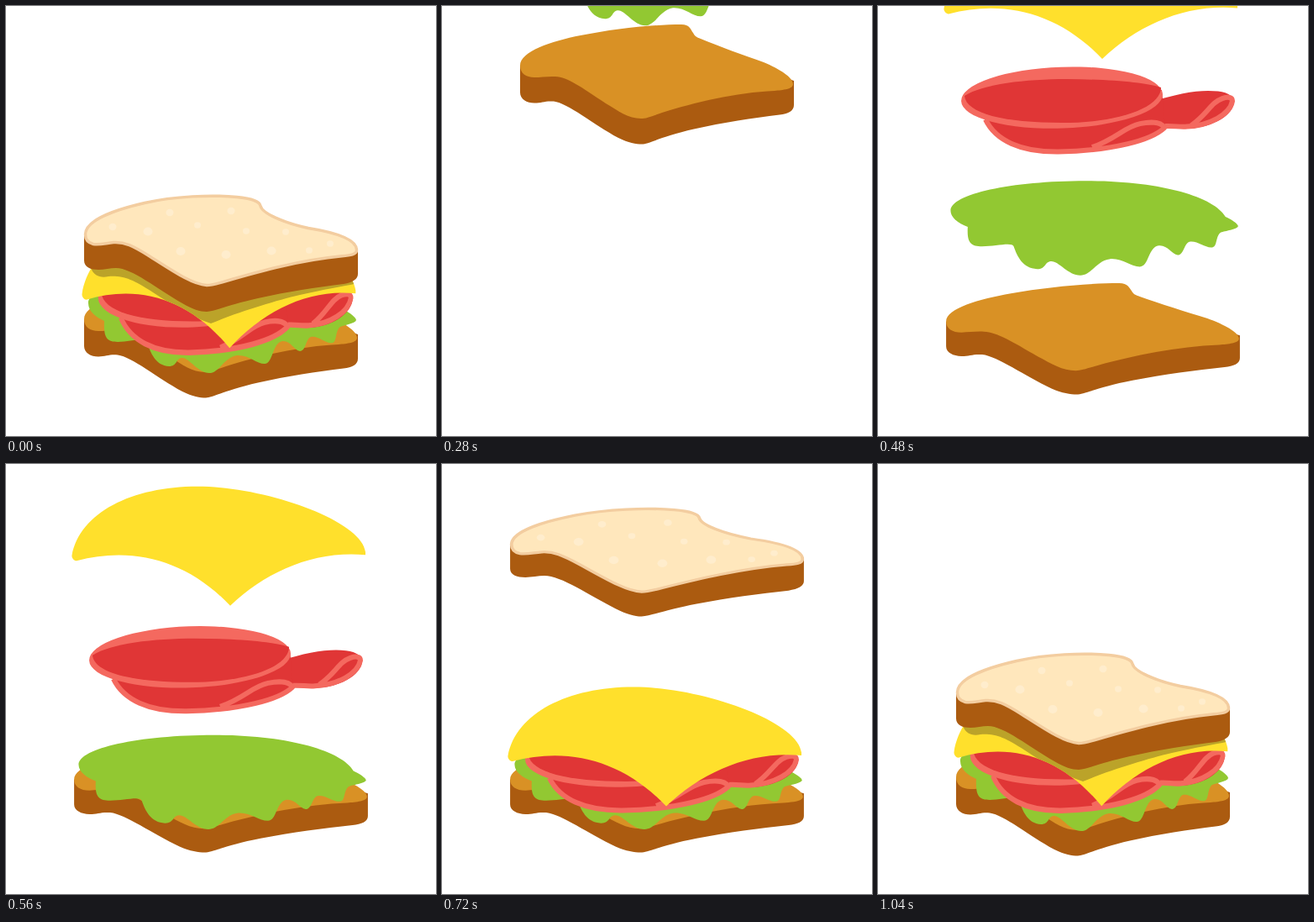
An HTML page for the animation above (1920 ms loop, 512 by 512 pixels).

```html
<!DOCTYPE html>
<html lang="en">
<head>
<meta charset="utf-8">
<title>Sandwich</title>
<style>
  html, body { margin: 0; width: 100%; height: 100%; overflow: hidden; background: #fff; }
  svg { display: block; width: 100%; height: 100%; }
  .crust { fill: #ab5b10; }
  .red { fill: #e03636; }
  .rim { fill: none; stroke: #f4695f; stroke-width: 6; stroke-linejoin: round; }
</style>
</head>
<body>
<svg viewBox="0 0 512 512">
  <defs>
    <path id="cheeseShape" transform="matrix(.932 0 0 1.0764 17.4 94.1)"
      d="M78.500 231C88 180 150 149 228 149C310 149 424 190 428 227V230.500C367 225 310 250 267 291C215 236 150 220 84 237.500C81 237.500 78 234 78.500 231Z"/>
    <clipPath id="onCheese"><use href="#cheeseShape"/></clipPath>
  </defs>
  <g id="stack">
    <g id="base">
      <path class="crust" d="M93 373V405C93 413 101 417.500 110 417.500C119 417.500 123 414.500 133 415.500C150 417.500 180 443 210 459C222 465 231 466.500 238 466.500C246 466.500 262 457 300 448.500C335 440.500 370 435.500 402 431.500C412 430.500 419 427 419 420V391L300 350Z"/>
      <path fill="#d99125" d="M93 373C93 356 130 344 165 337C205 329 250 324 285 324C295 324 296 330 299 334C301 338 303 339 308 341C330 350 360 361 383 369C402 377 418 387 418 395C418 401 406 402 396 403C350 405 300 417 262 429C250 433 243 436 237 436C222 436 210 427 195 418C165 398 150 387 135 386C125 385.5 118 387 110 387C100 387 93 382 93 373Z"/>
    </g>
    <g id="lettuce">
      <path fill="#92c832" transform="translate(0 316)" d="M98 38C98 17 165 0 248 0C330 0 390 20 403 46C409 49 417 55 417 58C416 62 402 64 398 66C392 70 394 84 389 85C381 87 372 76 363 78C357 80 357 95 350 95C343 94 339 82 329 83C317 85 318 110 308 110C298 110 289 99 275 100C260 102 254 121 242 121C228 121 218 102 209 103C202 104 204 113 194 113C178 112 172 97 168 84C166 78 148 84 133 84C120 84 116 79 117 59C108 55 98 48 98 38Z"/>
    </g>
    <g id="meat">
      <g transform="matrix(.932 0 0 1.0764 17.4 225.9)">
        <path class="red" d="M325 114C360 103 385 99 405 101.5C418 103 424 108 424 116C420 134 392 146 366 146C352 146 340 143 330 141Z"/>
        <path class="rim" d="M340 143C352 142 358 144.5 368 143.5C395 142 419 129 422 113C422 108 416 108 410 110C396 115 392 129 373 142"/>
        <path class="red" d="M127 135C140 160 165 175 215 175C285 175 325 160 342 146L338 100Z"/>
        <path class="rim" d="M128 135C140 160 170 174 215 173.5C280 172 325 160 341 145C337 137 322 138 312 140C293 144 284 158 255 168"/>
        <ellipse cx="219" cy="109" rx="120" ry="36.5" transform="rotate(-2 219 109)" fill="#f4695f"/>
        <path class="red" d="M103 107C125 93 175 87 225 87C275 87 320 91 337 97C337 120 290 139 219 139C150 139 105 128 103 107Z"/>
      </g>
    </g>
    <g id="cheese">
      <use href="#cheeseShape" fill="#ffe02c"/>
      <g clip-path="url(#onCheese)">
        <path id="shade" fill="#bba329" d="M101 312C105 322 113 324 122 322C140 321 150 325 175 341C200 357 222 371 244 378C275 365 320 351 350 344C380 337 400 334 419 330V300H101Z"/>
      </g>
    </g>
    <g id="lid">
      <path class="crust" d="M93 272V303C93 311 101 314 110 314C117 314 124 312 131 312C150 312 180 337 210 354C222 361 231 364 239 364C250 363 268 355 300 348C335 340 370 335 402 331C413 329 419 325 419 319V289L300 245L170 240Z"/>
      <path fill="#ffe7bc" stroke="#f3cda0" stroke-width="3.500" d="M94.5 272C94.5 255 130 242.500 165 234.500C200 226.500 245 224.500 275 227.500C292 229 302 233 303 238C305 247 330 258 360 264.500C385 268.500 417.500 276 417.500 290.500C417.500 296 410 297 400 297.800C350 302.500 300 316.500 262 327.500C252 330.500 245 332.500 239 332.500C222 331.500 200 316.500 171 298C151 285.500 141 280.500 128 281.500C118 282.500 112 284.500 104 283.500C98 282 94.5 278 94.5 272Z"/>
      <g id="crumbs" fill="#ffedcd"></g>
    </g>
  </g>
</svg>
<script>
  const LOOP = 1920, STEP = 40;
  const $ = id => document.getElementById(id);

  // layer, drop height, landing time
  const layers = [
    ["base", 484, 456.5],
    ["lettuce", 563.5, 543],
    ["meat", 617, 628.5],
    ["cheese", 686.5, 708],
    ["lid", 754, 840]
  ];

  const crumbs = [
    [127, 263, 4.5], [169, 268.5, 5.5], [195, 246, 4.5], [228, 261, 4],
    [268, 244, 4.5], [208, 292, 5.5], [262, 296, 5.5], [286, 268, 4],
    [316, 291.5, 5.5], [333, 269, 4], [361, 291, 4], [386, 283, 4]
  ];
  $("crumbs").innerHTML = crumbs.map(([x, y, r]) =>
    `<ellipse cx="${x}" cy="${y}" rx="${r}" ry="${r * 0.92}"/>`).join("");

  const ramp = (t, from, to) => Math.min(1, Math.max(0, (t - from) / (to - from)));
  const smooth = p => p * p * (3 - 2 * p);
  const moveY = (id, y) => $(id).setAttribute("transform", `translate(0 ${y})`);

  // constant acceleration from rest until the layer lands
  const fall = (t, height, land) =>
    t === 0 || t >= land ? 0 : height * ((t / land) ** 2 - 1);

  function draw(t) {
    const y = {};
    for (const [id, height, land] of layers) {
      y[id] = fall(t, height, land);
      moveY(id, y[id]);
    }
    moveY("shade", y.lid - y.cheese);

    const squash = ramp(t, 420, 480) - smooth(ramp(t, 840, 1040));
    const sx = 1 + 0.073 * squash, sy = 1 - 0.071 * squash;
    $("stack").setAttribute("transform",
      `translate(256 410) scale(${sx} ${sy}) translate(-256 -410)`);
  }

  const start = performance.now();
  function tick() {
    const t = (performance.now() - start) % LOOP;
    draw(Math.floor(t / STEP) * STEP);
    requestAnimationFrame(tick);
  }
  tick();
</script>
</body>
</html>
```
